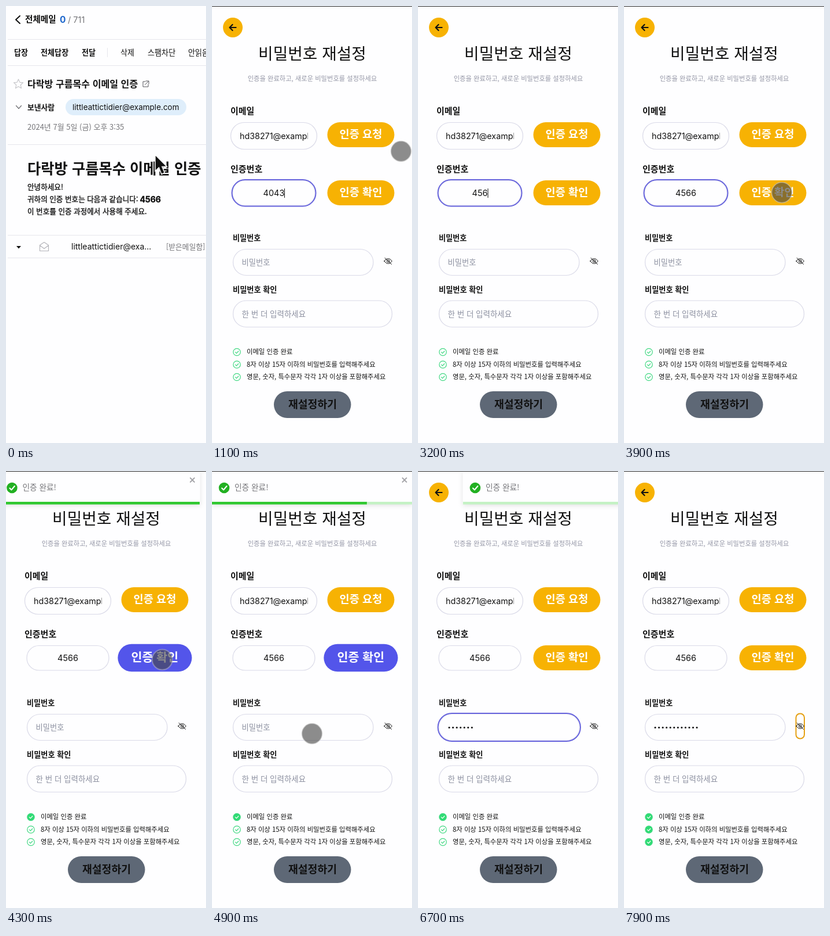
An HTML page for the animation above (8000 ms loop, 346 by 752 pixels).

```html
<!DOCTYPE html>
<html lang="ko">
<head>
<meta charset="utf-8">
<title>비밀번호 재설정</title>
<style>
  html, body { margin: 0; width: 100%; height: 100%; overflow: hidden; background: #fefeff; }
  svg { display: block; width: 346px; height: 752px; }
  text { font-family: "Noto Sans CJK KR", "Noto Sans CJK", sans-serif; fill: #111; white-space: pre; }
  .en { font-family: Inter, sans-serif; }
  .b { font-weight: 700; }
  .m text { stroke: #111; stroke-width: .35; }
  .l { font-weight: 300; }
  .mid { text-anchor: middle; }
  .gray { fill: #757579; }
  .hint { fill: #8c90a0; }
  .rule { stroke: #e6e6ec; }
  .icon { fill: none; stroke: #111; stroke-linecap: round; stroke-linejoin: round; }
  .field { fill: none; stroke: #dadae8; stroke-width: 1.2; }
  .ring { fill: none; stroke: #6663dc; stroke-width: 2; visibility: hidden; }
  .focus .ring { visibility: visible; }
  .focus .field { stroke: #ececf4; }
  #eye .ring { stroke: #e5a012; }
  .btn rect { fill: #f7b203; }
  .btn text { fill: #fff; font-weight: 900; }
  #confirm { transform-origin: 257.7px 321.5px; }
  #confirm.on { transform: scale(1.105); }
  #confirm.on rect { fill: #5355ea; }
  .check circle { fill: none; stroke: #40d882; stroke-width: 1.2; }
  .check path { fill: none; stroke: #40d882; stroke-width: 1.2; stroke-linecap: round; }
  .done circle { fill: #30dc74; }
  .done path { stroke: #fff; }

  #mail, #form, #pointer, #toast, #bar { animation: 8s linear infinite; }
  #mail { animation-name: mail; }
  #form { animation-name: form; }
  #pointer { animation-name: pointer; }
  #toast { animation-name: toast; }
  #bar { animation-name: bar; }
  @keyframes mail { 0%, 12.1% { visibility: visible; } 12.11%, 100% { visibility: hidden; } }
  @keyframes form { 0%, 12.1% { opacity: 0; } 12.11%, 100% { opacity: 1; } }
  @keyframes pointer {
    0%, 12.1% { transform: translate(322px, 250px); }
    13.75% { transform: translate(327px, 250px); animation-timing-function: ease-in-out; }
    27.5% { transform: translate(352px, 251px); }
    30%, 41% { transform: translate(368px, 252px); animation-timing-function: ease-in-out; }
    46.5%, 53% { transform: translate(273px, 321px); animation-timing-function: ease-in-out; }
    59.5%, 74% { transform: translate(173px, 452px); opacity: 1; }
    74.01%, 100% { transform: translate(173px, 452px); opacity: 0; }
  }
  @keyframes toast {
    0%, 50% { transform: translateX(1200px); animation-timing-function: cubic-bezier(.215, .61, .355, 1); }
    54% { transform: translateX(-12px); }
    55% { transform: translateX(6px); }
    56% { transform: translateX(-3px); }
    57%, 80.5% { transform: none; }
    82.2% { transform: translateX(-20px); animation-timing-function: ease-in; }
    89%, 100% { transform: translateX(1200px); }
  }
  @keyframes bar { 0%, 55.66% { transform: none; } 80.5%, 100% { transform: scaleX(0); } }
</style>
</head>
<body>
<svg viewBox="0 0 346 752">
  <defs>
    <clipPath id="emailClip"><rect x="47" y="205" width="119" height="36"/></clipPath>
    <filter id="shade" x="-5%" y="-10%" width="110%" height="150%">
      <feDropShadow dx="0" dy="2" stdDeviation="4" flood-color="#000" flood-opacity=".12"/>
    </filter>
  </defs>

  <g id="mail">
    <path class="icon" stroke-width="2" d="M24 17L17 23.5L24 30"/>
    <text class="b" x="33" y="28" font-size="14.6">전체메일</text>
    <text class="en b" x="93" y="28.5" font-size="15.5" style="fill:#1f68cc">0</text>
    <text class="en gray" x="107" y="28.5" font-size="14.5">/ 711</text>
    <path class="rule" d="M3 57.5H346M3 102.5H346M3 238.5H346M3 394.5H346M3 433.5H346M175.5 72V88"/>
    <g font-size="13.1">
      <text class="b" x="14" y="84.5">답장</text>
      <text class="b" x="60" y="84.5">전체답장</text>
      <text class="b" x="131" y="84.5">전달</text>
      <text x="198" y="84.5">삭제</text>
      <text x="245" y="84.5">스팸차단</text>
      <text x="315" y="84.5">안읽음</text>
    </g>
    <path class="icon" style="stroke:#c8c8cc" stroke-width="1.2" d="M21.5 126l2.4 5.3 5.7.6-4.3 3.9 1.2 5.7-5-2.9-5 2.9 1.2-5.7-4.3-3.9 5.7-.6z"/>
    <text class="b" x="37" y="139.5" font-size="16.1">다락방 구름목수 이메일 인증</text>
    <path class="icon" style="stroke:#55555a" d="M241 130H237V139H246V135M242 129H247V134M246.5 129.5L240.5 135.5"/>
    <path class="icon" style="stroke:#757579" stroke-width="1.3" d="M17.5 171.5L22 176.5L26.5 171.5"/>
    <text class="b" x="37" y="178.5" font-size="12.8">보낸사람</text>
    <rect x="103" y="160" width="209" height="28" rx="14" fill="#dfeefb"/>
    <text class="en" x="115" y="179" font-size="13.5">littleattictidier@example.com</text>
    <text class="gray" x="37" y="213" font-size="13">2024년 7월 5일 (금) 오후 3:35</text>
    <text class="b" x="37" y="288.5" font-size="25.3">다락방 구름목수 이메일 인증</text>
    <g class="m" font-size="12.6">
      <text x="37" y="316">안녕하세요!</text>
      <text x="37" y="337">귀하의 인증 번호는 다음과 같습니다:</text>
      <text class="en b" x="231.5" y="337.5" font-size="14">4566</text>
      <text x="37" y="358">이 번호를 인증 과정에서 사용해 주세요.</text>
    </g>
    <path d="M18 413H26L22 417.5Z" fill="#111"/>
    <path class="icon" style="stroke:#b4b4ba" stroke-width="1.2" d="M58.5 411.5L66 406.5L73.5 411.5V421.5H58.5ZM58.5 412L66 417.5L73.5 412"/>
    <text class="en" x="113" y="419" font-size="14">littleattictidier@exa...</text>
    <text class="gray" x="277" y="418.5" font-size="12.8">[받은메일함]</text>
    <path d="M258 256V284L264.5 278L269 289.5L274.5 287L270 276.5H278.5Z" fill="#111" stroke="#fff" stroke-width="1.5"/>
  </g>

  <g id="form">
    <rect width="346" height="752" fill="#fefeff"/>
    <circle cx="36" cy="37" r="17" fill="#f7b203"/>
    <path class="icon" stroke-width="2.2" d="M41.5 37H30.5M35.5 32L30.5 37L35.5 42"/>
    <text class="l mid" x="173.5" y="92" font-size="27.8">비밀번호 재설정</text>
    <text class="l mid" x="173.5" y="129" font-size="11.3" style="fill:#9496a6">인증을 완료하고, 새로운 비밀번호를 설정하세요</text>

    <text class="b" x="32" y="186" font-size="14.9">이메일</text>
    <rect class="field" x="32.5" y="200.5" width="149" height="46" rx="23"/>
    <g clip-path="url(#emailClip)"><text class="en" x="48" y="229" font-size="14.3">hd38271@example.com</text></g>
    <g class="btn">
      <rect x="199.5" y="200" width="116" height="43" rx="21.5"/>
      <text class="mid" x="257.5" y="227" font-size="18.7">인증 요청</text>
    </g>

    <text class="b" x="32" y="286" font-size="15">인증번호</text>
    <g id="code">
      <rect class="field" x="36" y="300.5" width="142" height="42.5" rx="21"/>
      <rect class="ring" x="34.5" y="299" width="145" height="45.5" rx="22.5"/>
      <text id="digits" class="en mid" x="107" y="327" font-size="14.5"></text>
      <rect id="caret" y="314" width="1" height="16" fill="#111"/>
    </g>
    <g class="btn" id="confirm">
      <rect x="199.5" y="300" width="116" height="43" rx="21.5"/>
      <text class="mid" x="257.5" y="327" font-size="18.7">인증 확인</text>
    </g>

    <text class="b" x="36" y="404" font-size="13.1">비밀번호</text>
    <g id="pw">
      <rect class="field" x="36.5" y="418.5" width="242.5" height="45" rx="22.5"/>
      <rect class="ring" x="34.5" y="417" width="246.5" height="48" rx="24"/>
      <text id="pwHint" class="hint" x="51.5" y="446" font-size="13.3">비밀번호</text>
      <path id="dots" fill="none" stroke="#111" stroke-width="3.2" stroke-linecap="round"/>
    </g>
    <g id="eye">
      <rect class="ring" x="297.5" y="417.5" width="14.5" height="43" rx="7"/>
      <path class="icon" d="M298 439Q304.5 430 311.5 439Q304.5 448 298 439ZM299 433.5L310.5 444.5"/>
      <circle class="icon" cx="304.7" cy="439" r="2.2"/>
    </g>

    <text class="b" x="36" y="493" font-size="13.2">비밀번호 확인</text>
    <rect class="field" x="36.5" y="507" width="275" height="45.5" rx="22.5"/>
    <text class="hint" x="51.5" y="535" font-size="13.5">한 번 더 입력하세요</text>

    <g class="check" id="mailOk"><circle cx="43" cy="595.5" r="6.2"/><path d="M40.3 595.7l2 2 3.5-3.7"/></g>
    <g class="check" id="lengthOk"><circle cx="43" cy="617" r="6.2"/><path d="M40.3 617.2l2 2 3.5-3.7"/></g>
    <g class="check" id="kindsOk"><circle cx="43" cy="638.5" r="6.2"/><path d="M40.3 638.7l2 2 3.5-3.7"/></g>
    <g font-size="11.35">
      <text x="60" y="599">이메일 인증 완료</text>
      <text x="60" y="620.5">8자 이상 15자 이하의 비밀번호를 입력해주세요</text>
      <text x="60" y="642">영문, 숫자, 특수문자 각각 1자 이상을 포함해주세요</text>
    </g>
    <rect x="107" y="663" width="133.5" height="46" rx="23" fill="#5e6876"/>
    <text class="mid" x="174" y="692" font-size="18.3" font-weight="900">재설정하기</text>

    <g id="toast">
      <rect y="1" width="346" height="56" fill="#fefeff" filter="url(#shade)"/>
      <circle cx="21" cy="29" r="9.3" fill="#22b022"/>
      <path class="icon" style="stroke:#fff" stroke-width="2" d="M17 29.5L20 32.5L25.5 26"/>
      <text class="gray" x="39" y="33" font-size="13.7">인증 완료!</text>
      <path class="icon" style="stroke:#a4a4a8" stroke-width="1.8" d="M329.5 12L336.5 19M336.5 12L329.5 19"/>
      <rect y="53" width="346" height="4.5" fill="#c4f2c4"/>
      <rect id="bar" y="53" width="346" height="4.5" fill="#30c830"/>
    </g>
    <rect width="346" height="1" fill="#2a2a2a"/>
    <circle id="pointer" r="17.5" fill="rgba(70,70,70,.62)" stroke="rgba(200,200,200,.6)" stroke-width="1.5"/>
  </g>
</svg>

<script>
  const LOOP = 8000;
  const $ = id => document.getElementById(id);

  // element, class, from, to (ms)
  const states = [
    ["code", "focus", 970, 3960],
    ["confirm", "on", 3960, 5080],
    ["mailOk", "done", 4080, LOOP],
    ["pw", "focus", 5080, 7480],
    ["eye", "focus", 7480, LOOP],
    ["lengthOk", "done", 6850, LOOP],
    ["kindsOk", "done", 7190, LOOP]
  ];

  const steps = (t, start, gap, max) =>
    Math.max(0, Math.min(max, Math.floor((t - start) / gap) + 1));

  function codeAt(t) {
    if (t < 2850) return "4043".slice(0, 4 - steps(t, 2380, 110, 4));
    return "4566".slice(0, steps(t, 2880, 150, 4));
  }

  function draw(t) {
    for (const [id, name, from, to] of states)
      $(id).classList.toggle(name, t >= from && t < to);

    const code = codeAt(t);
    $("digits").textContent = code;
    $("caret").setAttribute("x", 107 + code.length * 4.5);
    const blinkOff = (t > 1450 && t < 1950) || t > 3830;
    $("caret").style.visibility = blinkOff ? "hidden" : "inherit";

    const typed = steps(t, 5960, 112, 12);
    $("pwHint").style.display = typed ? "none" : "";
    let path = "";
    for (let i = 0; i < typed; i++) path += `M${54 + i * 6.55} 441.5h0`;
    $("dots").setAttribute("d", path);
  }

  const start = performance.now();
  function frame() {
    draw((performance.now() - start) % LOOP);
    requestAnimationFrame(frame);
  }
  frame();
</script>
</body>
</html>
```
